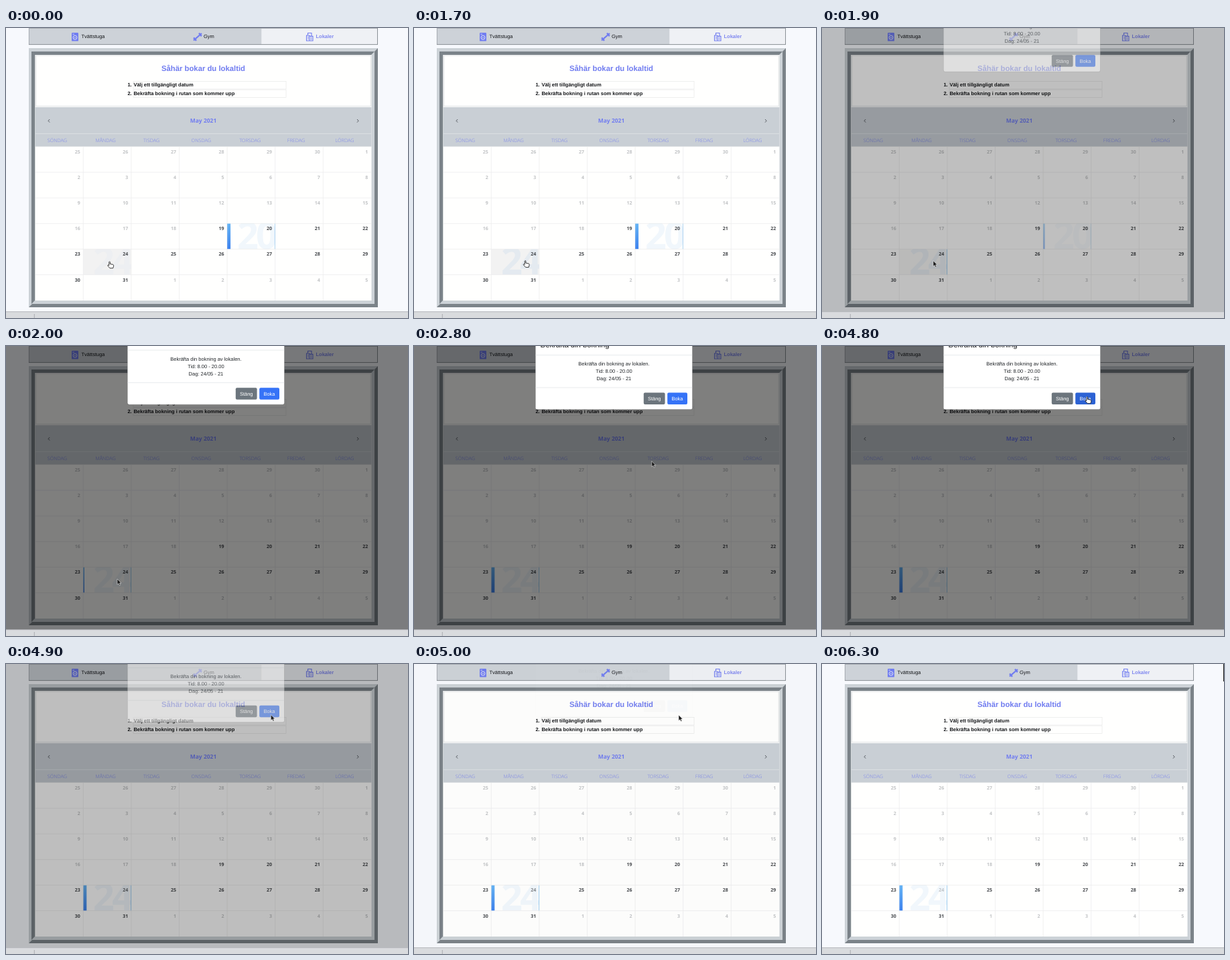
Write an HTML page that moves like this. It is 600 px wide and 432 px high and loops after 6.8 s.

```html
<!DOCTYPE html>
<html lang="sv">
<head>
<meta charset="utf-8">
<title>Boka lokal</title>
<style>
html, body { margin: 0; width: 100%; height: 100%; overflow: hidden; background: #f7f9fd; }
svg { display: block; width: 600px; height: 432px; text-rendering: geometricPrecision; }
.ui { font: 7.5px "Liberation Sans", Arial, sans-serif; }
.cal { font: 7px "Open Sans", sans-serif; }
.bold { font-weight: 700; }
.title { font-size: 11.3px; }
.month { font-size: 8.5px; }
.weekday { font-size: 7.3px; font-weight: 300; }
.big { font-weight: 700; font-size: 56px; letter-spacing: -.07em; }
</style>
</head>
<body>
<svg id="stage" viewBox="0 0 600 432" xmlns="http://www.w3.org/2000/svg"></svg>
<script>
const LOOP = 6800, STEP = 100;
const COL = 71.6, ROW = 38.15, LEFT = 43.7, TOP = 176.8;
const BLUE = '#717df0', INK = '#45484c';
const stage = document.getElementById('stage');

const rect = (x, y, w, h, fill, more = '') =>
  `<rect x="${x}" y="${y}" width="${w}" height="${h}" fill="${fill}" ${more}/>`;
const path = (d, fill, more = '') => `<path d="${d}" fill="${fill}" ${more}/>`;
const line = (d, color, width = 1) => path(d, 'none', `stroke="${color}" stroke-width="${width}"`);
const text = (x, y, str, cls, fill = '#15171a', more = '') =>
  `<text x="${x}" y="${y}" class="${cls}" fill="${fill}" ${more}>${str}</text>`;
const middle = 'text-anchor="middle"';
const each = (count, make) => Array.from({ length: count }, (_, i) => make(i)).join('');

function icons() {
  const washer = rect(98, 7, 10, 12.6, BLUE, 'rx="1.2"') +
    `<circle cx="103" cy="14.2" r="3" fill="${BLUE}" stroke="#e4e8f4" stroke-width=".9"/>` +
    line('M99.4 9.2H102M101.4 14.8Q103 13.2 104.6 14.8', '#e4e8f4', .8);
  const dumbbell = `<g transform="rotate(-41 286 13.3)">` + rect(281, 12.5, 10, 1.6, BLUE) +
    [279.6, 290].map(x => rect(x, 10.3, 2.4, 6, BLUE, 'rx=".6"')).join('') +
    rect(278, 12.3, 16, 2, BLUE) + '</g>';
  const house = line('M448.5 19V11H453V19ZM450.5 11V7.5H456V12.4M453 12.4H458V19H453', BLUE, 1.1) +
    line('M450 13.5H452M450 16H452M454.5 14.7H456.6M454.5 16.8H456.6', BLUE);
  return washer + dumbbell + house;
}

function tabs() {
  return rect(34, 0, 521, 25, '#cdd2d8') + rect(381.3, 0, 173.7, 25, '#eff1f5') +
    line('M34 .5H555M34.4 0V25', '#a6abb1') + line('M34 24.6H555M554.5 0V25', '#8a9096') + icons() +
    text(112.5, 15.4, 'Tvättstuga', 'ui') + text(295, 15.4, 'Gym', 'ui') +
    text(462.5, 15.4, 'Lokaler', 'ui bold', '#8088ef');
}

function frame() {
  const light = '#ccd2d7', dark = '#7b8389';
  const bevel = (x, y, w, h, a, b) => rect(x, y, w, h, a) +
    path(`M${x + w} ${y + h}h${-w}l5 -5h${w - 10}v${10 - h}l5 -5z`, b);
  return bevel(34, 30, 521, 386, light, dark) + bevel(38, 35, 512, 376, dark, light) +
    rect(43.3, 40, 502.2, 366, '#fffffe') +
    line('M44.5 41H544.5V116.5H44.5Z', '#e7e9ea', 1.6);
}

function guide() {
  const items = ['Välj ett tillgängligt datum', 'Bekräfta bokning i rutan som kommer upp'];
  return text(294.5, 64, 'Såhär bokar du lokaltid', 'ui bold title', BLUE, middle) +
    items.map((s, i) => {
      const y = 87.4 + i * 12.6;
      return rect(190, y - 8, 228, 11.6, 'none', 'stroke="#e7e8e9" stroke-width=".7"') +
        text(181.4, y, i + 1 + '.', 'ui bold') + text(190.4, y, s, 'ui bold');
    }).join('');
}

// Big background digits, and for a selectable day its blue bar and edge
function accent(day, col, row) {
  const x = LEFT + col * COL, y = TOP + row * ROW;
  return `<clipPath id="clip${day}">${rect(x, y, COL, ROW, '#000')}</clipPath>
    <g clip-path="url(#clip${day})">` +
    text(x + 14.8, y + 38, day, 'cal big', '#3f8fe0', `id="big${day}"`) +
    `<g id="mark${day}">` + rect(x, y, 5, ROW, 'url(#accent)', `id="bar${day}"`) +
    rect(x + COL - .8, y, .8, ROW, '#82c2f3') + '</g></g>';
}

function calendar() {
  const days = ['SÖNDAG', 'MÅNDAG', 'TISDAG', 'ONSDAG', 'TORSDAG', 'FREDAG', 'LÖRDAG'];
  return rect(43.5, 118, 502, 58.6, '#c9cfd5') + line('M44 157.4H545', '#dfe3e6', .9) +
    text(294.5, 141, 'May 2021', 'cal bold month', BLUE, middle) +
    line('M65.2 136L63 138.3L65.2 140.6M524 136L526.2 138.3L524 140.6', '#4a4f54', .9) +
    each(7, i => text(61.8 + i * COL, 170, days[i], 'cal weekday', '#7a84ec')) +
    rect(LEFT + COL, TOP + 4 * ROW, COL, ROW, '#f2f2f2', 'id="hover"') +
    each(6, i => line(`M${LEFT + (i + 1) * COL} ${TOP}V406`, '#ececee', .8)) +
    each(5, i => line(`M44 ${TOP + (i + 1) * ROW}H545`, '#ececee', .8)) +
    accent(20, 4, 3) + accent(24, 1, 4) + accent(25, 2, 4) +
    each(42, i => {
      const n = i - 5, day = n < 1 ? n + 30 : n > 31 ? n - 31 : n;
      return text(LEFT + (i % 7 + 1) * COL - 4.6, TOP + Math.floor(i / 7) * ROW + 10, day, 'cal bold',
        n >= 19 && n <= 31 ? INK : '#c2c4c6', `text-anchor="end" id="day${i}"`);
    });
}

function modal() {
  const body = ['Bekräfta din bokning av lokalen.', 'Tid: 8.00 - 20.00', 'Dag: 24/05 - 21'];
  return `<g id="modal">` +
    rect(181.3, -20, 234.2, 114.6, '#fff', 'rx="2.4" stroke="#555" stroke-opacity=".5" stroke-width=".6"') +
    text(188.6, 1.8, 'Bekräfta din bokning', 'ui title') +
    line('M181.5 13.5H415.2M181.5 62H415.2', '#dfe2e6', .7) +
    body.map((s, i) => text(298.4, 29 + i * 11, s, 'ui', '#212529', middle)).join('') +
    rect(342.8, 69.5, 31.8, 17.6, '#6c757d', 'rx="2"') +
    rect(378.2, 69.5, 29.8, 17.6, '#3673f7', 'rx="2" id="book"') +
    text(358.7, 81, 'Stäng', 'ui', '#fff', middle) +
    text(393, 81, 'Boka', 'ui', '#fff', middle) + '</g>';
}

const hand = path('M2.3 6.2V1.1Q3 -.5 3.9 1.1V4L8.3 4.9Q9.4 5.3 9.1 7L8.2 10.3H3.6L.3 6.6Q.3 5.3 1.2 5.6Z',
  '#fff', 'id="hand" stroke="#222" stroke-width=".9" stroke-linejoin="round"');
const arrow = path('M0 0V8.4L2 6.7L3.4 9.6L4.8 8.9L3.5 6.1H6Z', '#1b1b1b',
  'id="arrow" stroke="#fff" stroke-width=".5"');

stage.innerHTML = `<defs><linearGradient id="accent" x1="0" y1="1" x2="0" y2="0">
  <stop offset="0" stop-color="#3d82ee"/><stop offset="1" stop-color="#66b4f4"/></linearGradient></defs>` +
  rect(0, 0, 600, 432, '#f7f9fd') + tabs() + frame() + guide() + calendar() +
  rect(0, 0, 600, 423, '#000', 'id="shade"') + modal() +
  rect(0, 422.5, 600, 9.5, '#d9dbde') + line('M0 422.7H600', '#b0b3b7', .9) +
  line('M42.3 426V432', '#a6a9ad', .9) + rect(599, 0, 1, 26, '#111', 'id="rim"') + hand + arrow;

const el = {};
stage.querySelectorAll('[id]').forEach(n => el[n.id] = n);
const set = (id, name, value) => el[id].setAttribute(name, value);

const ramp = (t, from, to) => Math.min(1, Math.max(0, (t - from) / (to - from)));
const easeOut = p => 1 - (1 - p) ** 2;

// Pointer stops: time, x, y
const stops = [
  [0, 154.5, 347.5], [800, 204, 343], [1500, 166, 345.5], [2000, 166, 347],
  [2500, 336, 212], [3300, 386, 104], [3700, 391, 81], [4000, 391, 81],
  [4400, 456, 120], [4700, 396, 75], [5000, 395, 76], [5400, 307, 174], [5500, 433, 88]
];
function pointer(t) {
  const i = stops.findLastIndex(s => s[0] <= t);
  const [from, x, y] = stops[i];
  const [to, nextX, nextY] = stops[i + 1] || [from + 1, x, y];
  const p = ramp(t, from, to);
  return [x + (nextX - x) * p, y + (nextY - y) * p];
}

function draw(t) {
  const [x, y] = pointer(t);
  const opened = ramp(t, 1800, 2000), closed = ramp(t, 4800, 5005);
  const picked = ramp(t, 1900, 2200);
  const onButton = t > 2500 && t < 4900 && x > 378 && x < 408 && y > 69 && y < 87;
  const useHand = t < 1900 || onButton;

  set('hover', 'opacity', 1 - opened);
  set('big20', 'opacity', .07 * (1 - opened));
  set('big24', 'opacity', .025 + .045 * ramp(t, 0, 500));
  set('big25', 'opacity', .07 * Math.sin(Math.PI * ramp(t, 700, 1400)));
  set('bar20', 'width', 5 * (1 - opened));
  set('bar24', 'width', 5 * picked);
  set('mark20', 'opacity', 1 - opened);
  set('mark24', 'opacity', t < 1900 ? 0 : 1);
  set('mark25', 'opacity', 0);
  set('day29', 'opacity', 1 - .7 * ramp(t, 4800, 5200));

  set('shade', 'opacity', .5 * (opened - closed));
  set('modal', 'opacity', opened - closed);
  const lift = 66 * (1 - easeOut(ramp(t, 1800, 2100))) + 16 * closed;
  set('modal', 'transform', `translate(0 ${-lift})`);
  set('book', 'fill', onButton ? '#2c62d4' : '#3673f7');
  set('rim', 'opacity', ramp(t, 6100, 6300));

  set('hand', 'transform', `translate(${x - 3} ${y})`);
  set('arrow', 'transform', `translate(${x} ${y})`);
  set('hand', 'opacity', useHand ? 1 : 0);
  set('arrow', 'opacity', useHand || t >= 5600 ? 0 : 1);
}

const start = performance.now();
function tick() {
  const t = (performance.now() - start) % LOOP;
  draw(Math.floor(t / STEP) * STEP);
  requestAnimationFrame(tick);
}
draw(0);
requestAnimationFrame(tick);
</script>
</body>
</html>
```
